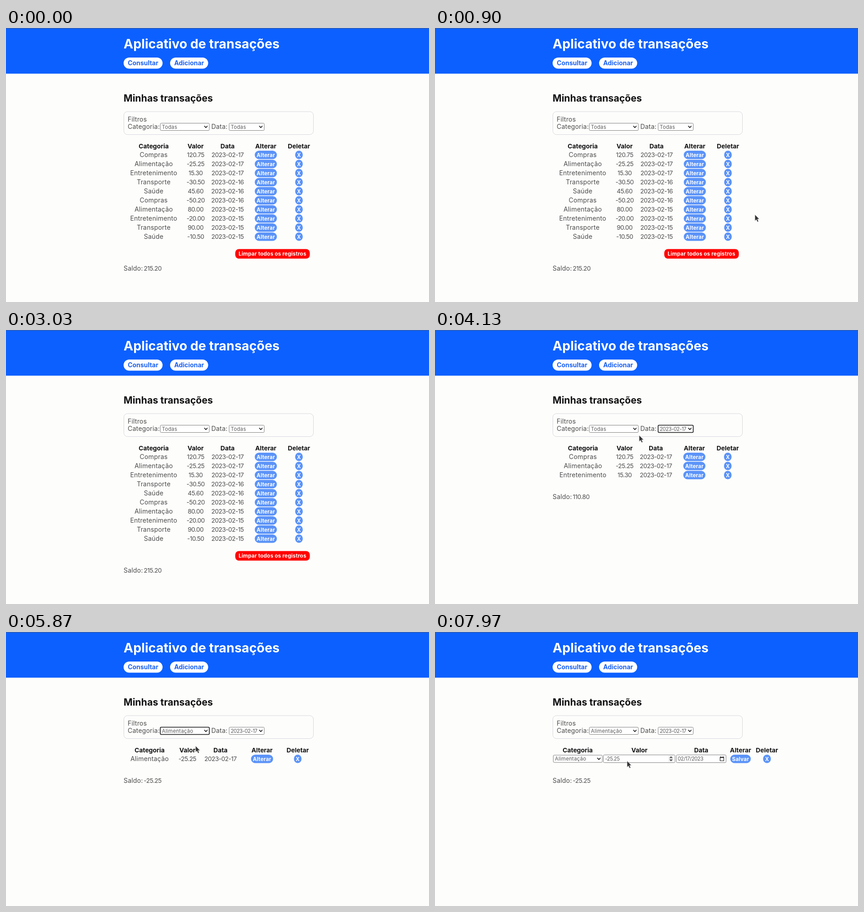
An HTML page that plays this animation: 928 px wide and 603 px high, repeating every 8000 ms.

```html
<!DOCTYPE html>
<html lang="pt-BR">
<head>
<meta charset="utf-8">
<title>Aplicativo de transações</title>
<style>
  html, body { margin: 0; width: 100%; height: 100%; overflow: hidden; background: #fdfdfc; }
  svg { display: block; width: 100%; height: 100%; }
  text { font: 14px Inter, 'Open Sans', sans-serif; font-optical-sizing: none; letter-spacing: .2px; fill: #4c4c4c; white-space: pre; }
  .mid { text-anchor: middle; }
  .num { font-size: 13.5px; letter-spacing: -.5px; }
  .small { font-size: 11.2px; letter-spacing: .3px; fill: #5a5a5a; }
  .small.num { letter-spacing: -.45px; }
  .title { font-size: 28.3px; font-weight: 700; letter-spacing: 0; fill: #fff; }
  .heading { font-size: 21.1px; font-weight: 700; letter-spacing: 0; fill: #111; }
  .th { font-size: 13.8px; font-weight: 700; letter-spacing: 0; fill: #111; }
  .nav { font-size: 13.9px; font-weight: 700; letter-spacing: 0; fill: #1c62f2; }
  .button { font-size: 11.6px; font-weight: 700; fill: #fff; }
  .field { fill: #fff; stroke: #808080; }
  .focus { stroke: #111; stroke-width: 1.6; }
  .chevron { fill: none; stroke: #222; stroke-width: 1.8; }
</style>
</head>
<body>
<svg viewBox="0 0 928 603" preserveAspectRatio="none">
  <rect width="928" height="603" fill="#fdfdfc"/>
  <rect width="928" height="100.5" fill="#0c60ff"/>
  <rect width="928" height="1" fill="#48597f"/>
  <text class="title" x="258" y="44.5">Aplicativo de transações</text>
  <rect x="258" y="65" width="85.5" height="24.5" rx="12.25" fill="#fff"/>
  <text class="nav mid" x="300.7" y="82">Consultar</text>
  <rect x="360" y="65" width="83.5" height="24.5" rx="12.25" fill="#fff"/>
  <text class="nav mid" x="401.7" y="82">Adicionar</text>
  <text class="heading" x="258" y="162">Minhas transações</text>
  <rect x="258.5" y="184" width="416" height="50.5" rx="8" fill="none" stroke="#d8d7dc"/>
  <text x="267" y="205.5">Filtros</text>
  <text x="267" y="221.5">Categoria:</text>
  <text x="450.5" y="221.5">Data:</text>
  <g id="content"></g>
  <path id="cursor" d="M0 0V13.2L3 10.4L5.4 15.6L7.6 14.6L5.3 9.6H9.3Z" fill="#333" stroke="#ccc" stroke-width=".6"/>
</svg>
<script>
const LOOP = 8000;
const rows = [
  ['Compras', 120.75, 17], ['Alimentação', -25.25, 17], ['Entretenimento', 15.3, 17],
  ['Transporte', -30.5, 16], ['Saúde', 45.6, 16], ['Compras', -50.2, 16],
  ['Alimentação', 80, 15], ['Entretenimento', -20, 15], ['Transporte', 90, 15], ['Saúde', -10.5, 15]
].map(([category, value, day]) => ({ category, value, date: '2023-02-' + day }));

// Column centres: category, value, date, edit, delete.
const phases = [
  { start: 0, category: 'Todas', date: 'Todas', columns: [324, 416, 486, 570, 642.7] },
  { start: 3200, category: 'Todas', date: '2023-02-17', focus: 'date', columns: [324.5, 416, 484.5, 569, 642.3] },
  { start: 4800, category: 'Todas', date: '2023-02-17', columns: [324.5, 416, 484.5, 569, 642.3] },
  { start: 5480, category: 'Alimentação', date: '2023-02-17', focus: 'category', columns: [315, 398, 470.5, 561.7, 640] },
  { start: 7200, category: 'Alimentação', date: '2023-02-17', editing: true, columns: [313, 448.5, 584, 670.3, 728.3] }
];

// Cursor visits: [time, x, y]; each group is one visible stretch.
const trails = [
  [[600, 930, 521], [900, 702, 411], [1600, 555.5, 212], [1950, 555.5, 212]],
  [[3200, 525, 248], [3450, 525, 248], [4050, 448, 232], [4200, 448, 232], [4650, 436, 213], [4800, 436, 213]],
  [[5480, 396, 251], [5800, 416, 251], [6150, 416, 251], [6800, 561, 276], [7250, 561, 276], [7900, 421.5, 284], [8000, 421.5, 284]]
];

const text = (x, y, label, style = '') => `<text class="${style}" x="${x}" y="${y}">${label}</text>`;
const box = (x, y, w, h, style = '') =>
  `<rect class="field ${style}" x="${x}" y="${y}" width="${w}" height="${h}" rx="2"/>`;
const pill = (x, y, w, label) =>
  `<rect x="${x - w / 2}" y="${y - 13.5}" width="${w}" height="18.5" rx="${Math.min(9.2, w / 2)}" fill="#5b93f8"/>` +
  text(x, y, label, 'button mid');
const select = (x, y, w, label, focused) =>
  box(x, y, w, 16, focused ? 'focus' : '') +
  text(x + 3.5, y + 12, label, /\d/.test(label) ? 'small num' : 'small') +
  `<path class="chevron" d="M${x + w - 11} ${y + 6}l3.5 3.7l3.5 -3.7"/>`;

function drawRow(row, y, [cat, val, date, edit, del]) {
  return text(cat, y, row.category, 'mid') +
    text(val, y, row.value.toFixed(2), 'num mid') +
    text(date, y, row.date, 'num mid') +
    pill(edit, y, 48.5, 'Alterar') + pill(del, y, 16.5, 'X');
}

function drawEditor(row, y, columns) {
  const [year, month, day] = row.date.split('-');
  return select(259.5, 271, 107.5, row.category) +
    box(369.5, 270.5, 157, 17) + text(373, 283, row.value.toFixed(2), 'small num') +
    '<rect x="512" y="272" width="11.5" height="14" fill="#efefef"/>' +
    '<path d="M514 277.5l3.8 -4l3.8 4zM514 280.5l3.8 4l3.8 -4z" fill="#505050"/>' +
    box(529.5, 270.5, 109, 17) + text(532.5, 283, `${month}/${day}/${year}`, 'small num') +
    '<path d="M625.5 275.5h8v8h-8zM625.5 276.5h8M627 275v-1.5M632 275v-1.5" fill="none" stroke="#222" stroke-width="1.2"/>' +
    pill(columns[3], y, 45, 'Salvar') + pill(columns[4], y, 17, 'X');
}

function drawContent({ category, date, focus, editing, columns }) {
  const matches = (filter, value) => filter === 'Todas' || filter === value;
  const shown = rows.filter(r => matches(category, r.category) && matches(date, r.date));
  const unfiltered = shown.length === rows.length;
  const draw = editing ? drawEditor : drawRow;
  const total = shown.reduce((sum, r) => sum + r.value, 0).toFixed(2);
  const totalY = unfiltered ? 533.5 : 311.5 + 20 * shown.length;
  return select(338.5, 209.5, 107.5, category, focus === 'category') +
    select(489.5, 209.5, 77, date, focus === 'date') +
    ['Categoria', 'Valor', 'Data', 'Alterar', 'Deletar']
      .map((label, i) => text(columns[i], 265, label, 'th mid')).join('') +
    shown.map((row, i) => draw(row, 283.5 + 20 * i, columns)).join('') +
    (unfiltered ? '<rect x="503" y="486.5" width="163.5" height="21" rx="8" fill="#f00"/>' +
      text(584.5, 501.3, 'Limpar todos os registros', 'button mid') : '') +
    text(258, totalY, 'Saldo:') + text(302.3, totalY, total, 'num');
}

function cursorAt(time) {
  const trail = trails.find(t => time >= t[0][0] && time < t.at(-1)[0]);
  if (!trail) return null;
  const next = trail.findIndex(stop => stop[0] > time);
  const [t0, x0, y0] = trail[next - 1], [t1, x1, y1] = trail[next];
  const u = (time - t0) / (t1 - t0), ease = u * u * (3 - 2 * u);
  return [x0 + (x1 - x0) * ease, y0 + (y1 - y0) * ease];
}

const content = document.getElementById('content');
const cursor = document.getElementById('cursor');
let current;

function render() {
  const time = performance.now() % LOOP;
  const phase = phases.findLast(p => p.start <= time);
  if (phase !== current) content.innerHTML = drawContent(current = phase);
  const position = cursorAt(time);
  cursor.style.display = position ? '' : 'none';
  if (position) cursor.setAttribute('transform', `translate(${position})`);
  requestAnimationFrame(render);
}
render();
</script>
</body>
</html>
```
